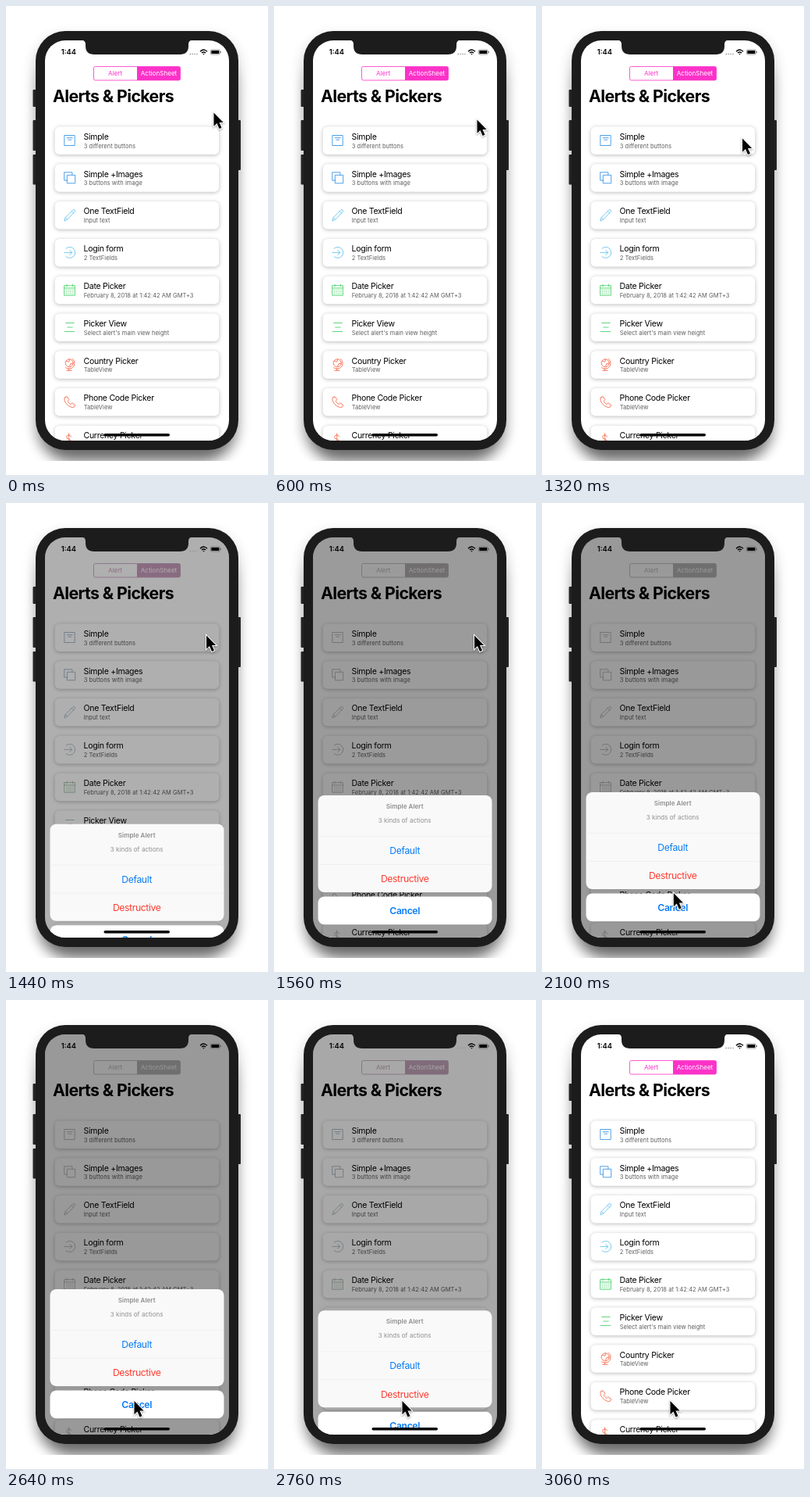
Write an HTML page that moves like this. It is 336 by 600 pixels and loops after 3.3 s.

```html
<!DOCTYPE html>
<html lang="en">
<head>
<meta charset="utf-8">
<title>Alerts &amp; Pickers</title>
<style>
  html, body { margin: 0; width: 100%; height: 100%; overflow: hidden; background: #fff; }
  svg { display: block; font-family: Inter, Roboto, sans-serif; }
  .middle { text-anchor: middle; }
  .card { fill: #fff; filter: drop-shadow(0 1px 2.5px rgba(0, 0, 0, .27)); }
  .name { font-size: 10.5px; letter-spacing: -.26px; }
  .note { font-size: 7.5px; letter-spacing: .05px; fill: #5c5c5c; }
  .small { font-size: 8.1px; }
  .action { font-size: 12.2px; letter-spacing: -.38px; }
  .icon { fill: none; stroke-width: .9; stroke-linecap: round; stroke-linejoin: round; }
  .pointer { paint-order: stroke; stroke: #fff; stroke-width: 2; filter: drop-shadow(0 1px 1px rgba(0, 0, 0, .35)); }
</style>
</head>
<body>
<svg width="336" height="600" viewBox="0 0 336 600">
  <defs>
    <clipPath id="screen"><rect x="50" y="44" width="236" height="512" rx="26"/></clipPath>
    <clipPath id="ground"><rect width="336" height="582"/></clipPath>
  </defs>

  <g clip-path="url(#ground)">
    <rect x="32" y="34" width="272" height="546" rx="44" opacity=".09" style="filter:blur(7px)"/>
    <rect x="44" y="60" width="248" height="522" rx="40" opacity=".55" style="filter:blur(9px)"/>
  </g>
  <g fill="#222">
    <rect x="34.5" y="107" width="6" height="22" rx="1"/>
    <rect x="34.5" y="146" width="6" height="39" rx="1"/>
    <rect x="34.5" y="190" width="6" height="38.500" rx="1"/>
    <rect x="295" y="146" width="6" height="64" rx="1"/>
    <rect x="38" y="32" width="260" height="536" rx="38" fill="#1c1c1c"/>
  </g>

  <g clip-path="url(#screen)">
    <rect x="50" y="44" width="236" height="512" fill="#fff"/>
    <g class="small middle">
      <rect x="112.5" y="77.5" width="111" height="17.500" rx="2" fill="#fff" stroke="var(--pink)" stroke-width=".8"/>
      <path d="M168 77.500H221.500a2 2 0 0 1 2 2V93a2 2 0 0 1-2 2H168z" fill="var(--pink)"/>
      <text x="140" y="89" fill="var(--pink)">Alert</text>
      <text x="196" y="89" fill="#fff">ActionSheet</text>
    </g>
    <text x="60" y="123" font-size="21.3" font-weight="700" letter-spacing="-.6">Alerts &amp; Pickers</text>
    <g id="cards"></g>
    <rect id="dim" x="50" y="44" width="236" height="512"/>

    <text class="middle" x="80.3" y="62.300" font-size="9.3" font-weight="600">1:44</text>
    <path d="M235.500 61.500h10" stroke="#999" stroke-width="1.5" stroke-dasharray="1.5 1.400"/>
    <g fill="none" stroke="#000" stroke-width="1.4">
      <path d="M249 58.300q4.500-4.400 9 0M250.900 60.100q2.600-2.400 5.200 0"/>
      <path d="M252.300 61l1.200 1.400 1.200-1.400z" fill="#000" stroke="none"/>
      <rect x="262.300" y="56" width="12" height="6" rx="1.600" stroke-width=".6" stroke="#555"/>
      <rect x="263.300" y="57" width="10" height="4" rx=".8" fill="#000" stroke="none"/>
      <path d="M275.400 58v2" stroke="#555" stroke-width=".8"/>
    </g>

    <g id="sheet" class="middle">
      <rect x="56.500" y="370" width="223" height="124" rx="8" fill="#f9f9f9"/>
      <path d="M56.500 422.500h223M56.500 458.500h223" stroke="#ececec" stroke-width=".7"/>
      <rect x="56.500" y="499.500" width="223" height="35.800" rx="8" fill="#fff"/>
      <g class="small" fill="#8f8f8f">
        <text x="167.700" y="387" font-weight="600">Simple Alert</text>
        <text x="167.700" y="405">3 kinds of actions</text>
      </g>
      <g class="action" fill="#087cf5">
        <text x="167.700" y="445">Default</text>
        <text x="167.700" y="481.300" fill="#ff3b30">Destructive</text>
        <text x="167.700" y="522" font-weight="600">Cancel</text>
      </g>
    </g>
    <rect x="125.500" y="547" width="84.500" height="3.400" rx="1.700"/>
  </g>
  <path d="M97 43.500q5 .5 5 5.500v2q0 11 11 11h110q11 0 11-11v-2q0-5 5-5.500z" fill="#1c1c1c"/>
  <path id="pointer" class="pointer" d="M0 0V17.200L4 13.600L7 20.600L10 19.300L7 12.500H12.200Z"/>
</svg>

<script>
const LOOP = 3300, STEP = 60;
const OPEN = 1320, CLOSE = 2732, TRAVEL = 187;

const tints = {
  pink: [252, 50, 200], blue: [61, 150, 232], sky: [104, 196, 236],
  green: [76, 211, 110], coral: [245, 105, 75]
};

// Icon paths are centred on 0,0.
const cards = [
  ["Simple", "3 different buttons", "blue",
    "M-6.500-6.500h13v13h-13zM-3.500-3.300h7M-2-.8h4"],
  ["Simple +Images", "3 buttons with image", "blue",
    "M-3-3.500h10v10.500h-10zM-3 3.300h-4v-10.300h10.200v3.300"],
  ["One TextField", "Input text", "sky",
    "M-6.800 7l1.200-4L4-6.600q1.200-1 2.300.1t0 2.400L-3 5.500zM-5.600 3L-3 5.500M2.500-5l2.500 2.500"],
  ["Login form", "2 TextFields", "sky",
    "M-4.700-5.200A7 7 0 1 1-4.700 5.200M-7 0H3M0-3L3 0L0 3"],
  ["Date Picker", "February 8, 2018 at 1:42:42 AM GMT+3", "green",
    "M-6.700-5.500h13.400v12.500h-13.400zM-6.700-2.300h13.400M-3.700-7v2.500M3.700-7v2.500" +
    [0, 2.4, 4.800].map(y => [-4, -1.400, 1.200, 3.800].map(x => `M${x} ${y}h.6`).join("")).join("")],
  ["Picker View", "Select alert's main view height", "green",
    "M-5-5.500h10.500M-3 0h6.500M-6.500 5.500h12.500"],
  ["Country Picker", "TableView", "coral",
    "M4.500-2a5 5 0 1 1-10 0a5 5 0 1 1 10 0M3.500-7.500a7 7 0 0 1-8.500 11.500M-1 5v2.500M-4 7.500h6.500M-4-4.500l3 1 1-3M0 2l1-3 3-.5"],
  ["Phone Code Picker", "TableView", "coral",
    "M-5.800-6l2.300-1 2.700 4-1.800 1.900q1.400 2.700 3.800 4l1.800-1.700 4 2.600-.9 2.500q-2 1.300-4.500.2q-6.300-2.700-8.300-8.600q-.6-2.200.9-3.900z"],
  ["Currency Picker", "TableView", "coral",
    "M-1-7.500v15M2-3.500q-1-2-3-2q-3 0-3 2.500t3 3t3 3t-3 2.500q-2 0-3-2"]
];

document.getElementById("cards").innerHTML = cards.map(([name, note, tint, icon], i) => `
  <g transform="translate(0 ${154.500 + 47.800 * i})">
    <rect class="card" x="62.700" width="210.500" height="35.500" rx="6"/>
    <path class="icon" d="${icon}" stroke="var(--${tint})" transform="translate(81.700 17.500)"/>
    <text class="name" x="99.500" y="16.300">${name}</text>
    <text class="note" x="99.700" y="27.200">${note}</text>
  </g>`).join("");

// Pointer stops: time, x, y.
const path = [
  [0, 266.500, 136.500], [540, 266.500, 136.500], [600, 260.500, 145.500], [660, 254, 155], [720, 249, 162],
  [780, 247.500, 166], [840, 250, 168.500], [960, 257, 169.500], [1740, 257, 169.500], [1800, 223.500, 315],
  [1920, 193, 418], [2040, 173.500, 481], [2100, 168.800, 499], [2160, 166.300, 507],
  [2280, 164.500, 513], [LOOP, 164.500, 513]
];

function pointerAt(t) {
  const next = path.findIndex(stop => stop[0] > t);
  const [t0, x0, y0] = path[next - 1], [t1, x1, y1] = path[next];
  const k = (t - t0) / (t1 - t0);
  return [x0 + (x1 - x0) * k, y0 + (y1 - y0) * k];
}

// Critically damped spring from 0 to 1.
function spring(ms) {
  const a = Math.max(0, ms) * .024;
  return 1 - (1 + a) * Math.exp(-a);
}

const sheet = document.getElementById("sheet");
const dim = document.getElementById("dim");
const pointer = document.getElementById("pointer");

function draw(now) {
  const t = Math.floor((now % LOOP) / STEP) * STEP;
  const shown = t >= 3060 ? 0 : spring(t - OPEN) - spring(t - CLOSE);
  sheet.setAttribute("transform", `translate(0 ${TRAVEL * (1 - shown)})`);
  dim.setAttribute("opacity", .4 * shown);
  for (const [name, rgb] of Object.entries(tints)) {
    const mixed = rgb.map(c => Math.round(c + (184 - c) * shown));
    document.documentElement.style.setProperty("--" + name, `rgb(${mixed})`);
  }
  pointer.setAttribute("transform", `translate(${pointerAt(t)})`);
}

let start;
function tick(now) {
  start ??= now;
  draw(now - start);
  requestAnimationFrame(tick);
}
draw(0);
requestAnimationFrame(tick);
</script>
</body>
</html>
```
